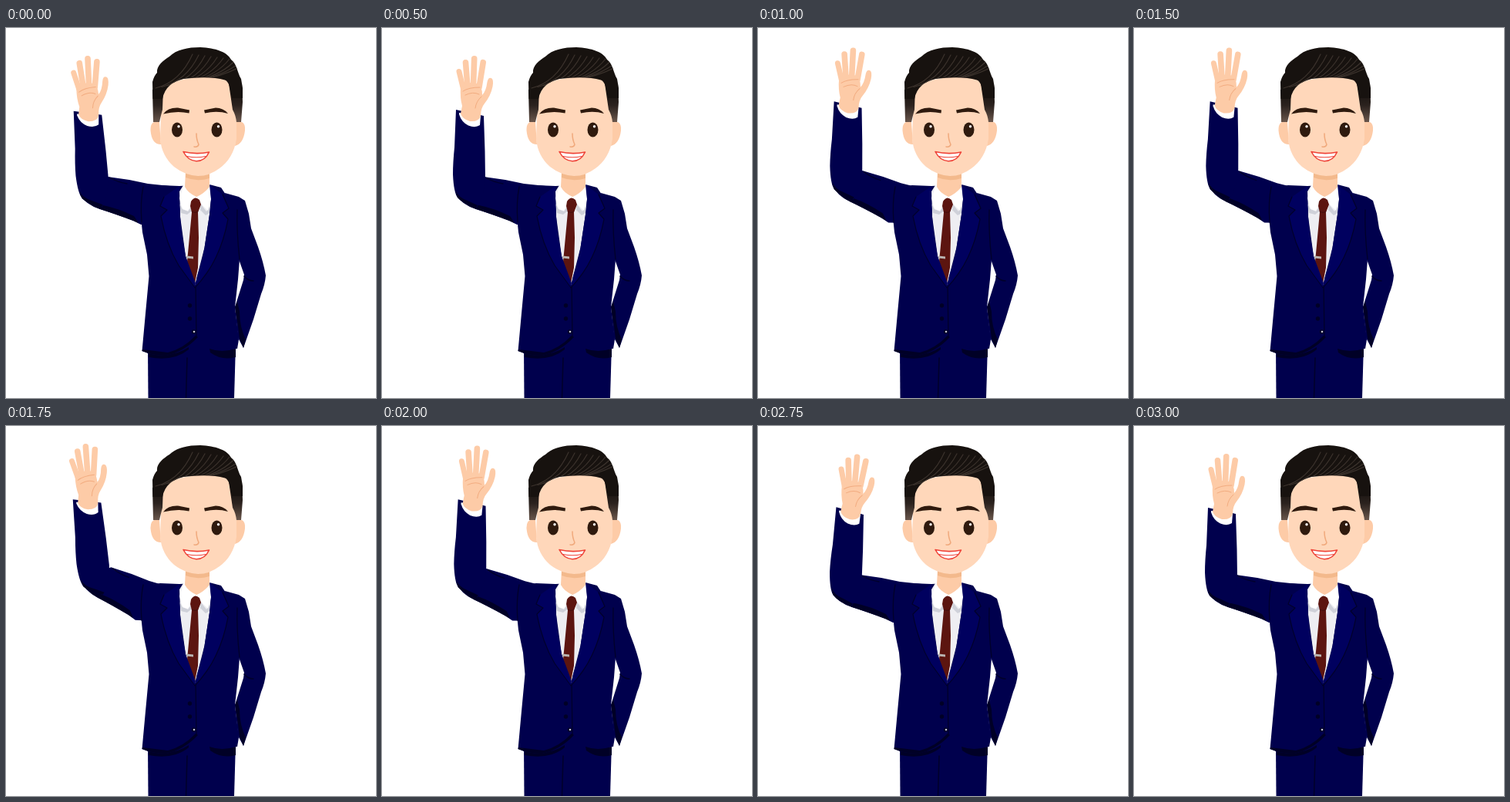
Write an HTML page that moves like this. It is 480 px wide and 480 px high and loops after 3.25 s.

```html
<!DOCTYPE html>
<html lang="en">
<head>
<meta charset="utf-8">
<title>Waving man</title>
<style>
html, body { margin: 0; width: 100%; height: 100%; overflow: hidden; background: #fff; }
svg { display: block; width: 100vw; height: 100vh; }
.navy { fill: #00004d; }
.dark { fill: #000026; }
.lapel { fill: #00005f; }
.skin { fill: #ffd7ba; }
.hand { fill: #fdcba7; }
.line { fill: none; stroke-linecap: round; stroke-linejoin: round; }
.seam { stroke: #00002a; }
.crease { stroke: #f2ac80; stroke-width: 1; }
</style>
</head>
<body>
<svg viewBox="0 0 480 480">
  <defs>
    <linearGradient id="fade" x1="0" y1="82" x2="0" y2="123" gradientUnits="userSpaceOnUse">
      <stop offset="0" stop-color="#17120f"/>
      <stop offset=".45" stop-color="#2b221e"/>
      <stop offset="1" stop-color="#6c584d"/>
    </linearGradient>
    <clipPath id="hairClip"><path d="M191 84C188 70 191 63 196 58C195 49 204 42 212 37C221 28 236 25 252 25C272 26 287 31 292 41C300 47 300 58 305 66L306 84L293 90L287 69Q264 60 230 66L213 73L203 84Z"/></clipPath>
  </defs>

  <!-- trousers -->
  <path class="navy" d="M184 416L236 395H260L298 410L296 480H184.500Z"/>
  <path class="line seam" stroke-width="1.500" d="M235 428L233.500 480"/>
  <path class="dark" d="M185 421Q215 429 237 414L237 417Q218 433 185 427ZM264 416Q280 422 298 416L298 427Q280 432 265 421Z"/>

  <!-- sleeve at the pocket -->
  <path class="navy" d="M284 214L302 219L310 224L315 241L318 260L327 284Q334 304 337 321Q336 333 331 345L321 378L308 415L301 402L297 362L308 327L309 320L302 300L290 260Z"/>
  <path class="dark" d="M300 355L297 362L301 387L303 403L308 415L311 404Q303 388 303 368Z"/>
  <path class="line seam" stroke-width="1.500" d="M309 322Q314 328 321 328"/>

  <g id="upper">
    <path class="navy" d="M132 193L160 197L184 202L222 206L215 250L175 255L165 250Q141 241 122 235Q103 229 96 216Z"/>
    <path class="dark" d="M102 222Q112 229 126 230Q146 234 166 244L172 253L165 250Q141 241 122 235Q108 230 102 222Z"/>
    <path class="line seam" stroke-width="1.300" d="M134 194Q145 200 157 202"/>
  </g>

  <g id="fore">
    <path class="navy" d="M96 106L132 114L133.500 160L134 196Q133 216 123 233Q106 229 98 220Q93 213 92 190Q92 174 94 155Z"/>
    <path class="dark" d="M95 210Q99 220 111 224L124 230L122 233Q106 229 98 220Z"/>
    <path fill="#fff" d="M100 110L128 114L127 126Q121 130 112 126.500Q103 122 100 112Z"/>
    <path class="hand" d="M102 111L104 101Q101 90 102 77Q105 71 113 71L124 72Q130 75 130 87Q135 82 136.500 70Q138 63 142.500 65.500Q145 68 143.500 76Q141 88 133 98Q128 104 128 114Q126 122 114 121Q104 118 102 111Z"/>
    <g class="line" stroke="#fdcba7">
      <path stroke-width="7" d="M105.500 79L100 56.500"/>
      <path stroke-width="7.600" d="M111 76L108.500 44.700"/>
      <path stroke-width="7.600" d="M118.500 74L119.700 39.700"/>
      <path stroke-width="7.600" d="M126 77L131.200 44.700"/>
    </g>
    <path class="line crease" d="M105 82Q112 77 127 77M108 87Q118 82 126 86M129 89Q122 95 121 104"/>
  </g>

  <!-- jacket -->
  <path class="navy" d="M176 228Q183 206 200 204L225 205L264 203L279 207L285 216L299 240L303 300L301 326L297 362L302 404L300 416Q280 419 262 411L247 400Q229 420 208 425Q190 425 176.500 419L181 370L185.500 322L183 294L177 265L175 245Z"/>
  <path class="line seam" stroke-width="1.300" d="M178 206Q174 226 176 252M300 236Q299 264 303 300M246 332L247 400"/>
  <path class="dark" d="M246 399Q230 416 210 421L177 417L176.500 419Q190 425 208 425Q231 420 249 401Z"/>

  <!-- shirt, neck, tie -->
  <path fill="#eeeef2" d="M230 204L265 203L266 222L264 242L257.500 285L248 322L245 334L233 296L226 245L225 212Z"/>
  <path fill="#cfd1d9" d="M225 228L229 235L236 238L242 230L240 238L235 242L227 240ZM253 229L260 238L265 230L264 240L259 243L252 236Z"/>
  <path fill="#fff" d="M231 202L225 221L229 235L236 237L246 220L254 229L262 237L266 222L263 202Z"/>
  <path class="hand" d="M233 186H264V206Q257 215 247 219Q236 214 232 206Z"/>
  <path fill="#f3b98c" d="M233 188H264V195Q248 200 233 194Z"/>
  <path fill="#5c1510" d="M240 225Q245 217 251 223L253 229L249 239L250 272L249 311L245 331L235 303L241 239L239 231Z"/>
  <path class="line" stroke="#440e0c" stroke-width="1" d="M241 238Q245 241 249 238"/>
  <path fill="#b9b3b0" d="M234 295.500L243 296.500V299.500L234 298.500Z"/>

  <!-- lapels -->
  <path class="lapel" d="M225 205L205 219L200 231L209 236L201 244Q208 280 224 308L244 337L246 331L233 296Q227 262 226 245L225 220Z"/>
  <path class="lapel" d="M264 203L281 216L289 234L281 240L288 248Q281 282 266 309L245 337L248 322Q255 300 257.500 285L264 242L266 222Z"/>
  <path class="line seam" stroke-width="1.200" d="M205 219L200 231L209 236L201 244Q208 281 224 308L245 337Q278 303 288 248L281 240L289 234L281 216"/>
  <circle class="dark" cx="238.500" cy="360" r="2.700"/>
  <circle class="dark" cx="238.500" cy="377" r="2.700"/>
  <circle class="dark" cx="243.500" cy="394" r="2.700"/>
  <circle cx="244" cy="394" r="1.300" fill="#c5c5ce"/>

  <!-- head -->
  <path class="hand" d="M199 122Q187 119 187.500 133Q189 151 201 151ZM299 122Q311 119 310 133Q308 150 297 153Z"/>
  <path class="skin" d="M201 112L203 76Q244 57 289 67L299 112L299 144Q295 169 277 182Q264 192 249 192Q232 191 218 180Q202 166 200 144Z"/>
  <path fill="url(#fade)" d="M190 80L204 76L203 106Q201 113 199 122L191 122ZM289 72L306 72L307 96L305 122L299 122Q298 113 294 106Z"/>
  <path fill="#17120f" d="M190.500 92L190 70Q192 62 196 58C195 49 204 42 212 37C221 28 236 25 252 25C272 26 287 31 292 41C300 47 300 58 305 66L307 78V91L293 91L290 76Q288 69 284 67.500Q264 62 230 66Q219 69 213 74Q205 81 203 92Z"/>
  <g id="hair" class="line" stroke="#3b322c" stroke-width="1.200" clip-path="url(#hairClip)"></g>
  <path fill="#2f1a0e" d="M204 111.500Q210 103 223 103.500L238 106.500L237.500 110.500Q222 107 204 111.500ZM257 106.500L272 103.500Q282 103.500 288 111Q274 107 258 110.500Z"/>
  <g fill="#2f1a0e">
    <ellipse cx="222" cy="132" rx="7" ry="9.500"/>
    <ellipse cx="273.500" cy="132" rx="7" ry="9.500"/>
  </g>
  <g fill="#fff">
    <circle cx="224" cy="127.700" r="1.700"/>
    <circle cx="275.500" cy="127.700" r="1.700"/>
  </g>
  <path class="line" stroke="#f0a97c" stroke-width="1.500" d="M247 137Q247 145 250 151Q249 155 244 154"/>
  <path class="line" stroke="#ef4338" stroke-width="1.600" d="M230 160.500Q247 164.500 263.500 161Q258 172.800 247 172.800Q236 172 230 160.500Z" style="fill:#fff"/>
  <path class="line" stroke="#ef4338" stroke-width="1.200" d="M235 166.500Q247 169 259 166.500"/>
</svg>
<script>
const LOOP = 3250, HOLD = 500, STEP = 250;
const SHOULDER = [190, 212], ELBOW = [114, 210];

// [upper-arm lift, forearm tilt] in degrees
const LOW = [0, 0], UP = [8, 0.9], LEFT = [10, -6], RIGHT = [8, 5];
const POSES = [
  [0, -4.6], LOW, [3, 3], UP, RIGHT, UP, LEFT, UP, RIGHT, UP, [0, 3], LOW
];

const upper = document.getElementById('upper');
const fore = document.getElementById('fore');

// Strands sweep from the hairline up and to the right.
function combHair() {
  const hair = document.getElementById('hair');
  for (let i = 0; i < 10; i++) {
    const p = document.createElementNS('http://www.w3.org/2000/svg', 'path');
    const x = 194 + i * 8, y = 78 - i * 1.5;
    p.setAttribute('d', `M${x} ${y}Q${x + 32} ${y - 8} ${x + 48} ${34 + i}`);
    hair.append(p);
  }
}

function turn(point, pivot, degrees) {
  const a = degrees * Math.PI / 180, c = Math.cos(a), s = Math.sin(a);
  const x = point[0] - pivot[0], y = point[1] - pivot[1];
  return [pivot[0] + x * c - y * s, pivot[1] + x * s + y * c];
}

function draw(ms) {
  const t = ms % LOOP;
  const index = t < HOLD ? 0 : 1 + Math.floor((t - HOLD) / STEP);
  const [lift, tilt] = POSES[index];
  const [x, y] = turn(ELBOW, SHOULDER, lift);
  upper.setAttribute('transform', `rotate(${lift} ${SHOULDER})`);
  fore.setAttribute('transform',
    `translate(${x - ELBOW[0]} ${y - ELBOW[1]}) rotate(${tilt} ${ELBOW})`);
}

combHair();
const start = performance.now();
function tick() {
  draw(performance.now() - start);
  requestAnimationFrame(tick);
}
tick();
</script>
</body>
</html>
```
